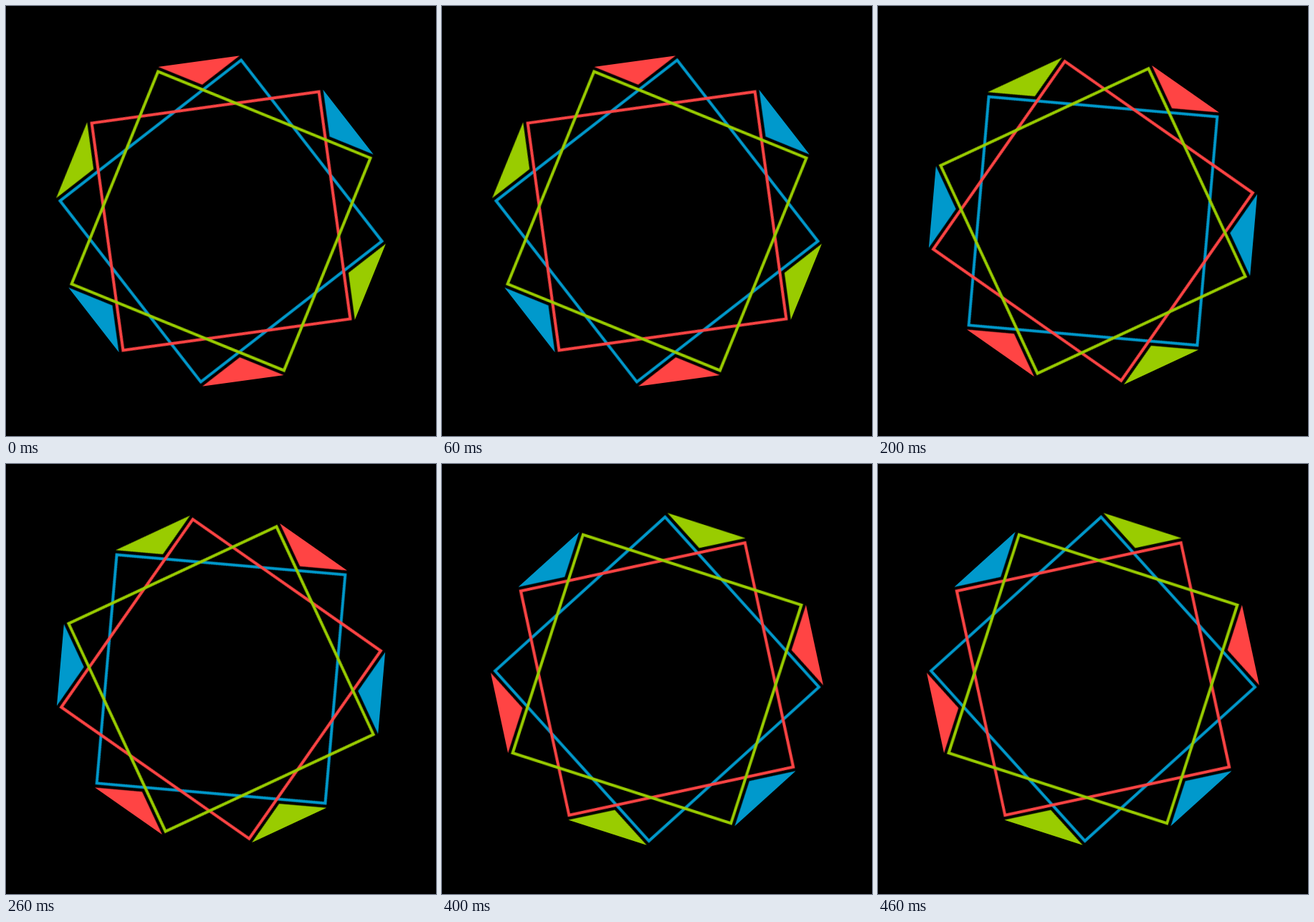
Write an HTML page that moves like this. It is 600 px wide and 600 px high and loops after 500 ms.

```html
<!DOCTYPE html>
<html lang="en">
<head>
<meta charset="utf-8">
<title>Turning squares</title>
<style>
  html, body { margin: 0; width: 100%; height: 100%; overflow: hidden; background: #000; }
  svg { display: block; width: 600px; height: 600px; }
  .red { color: #f44; }
  .blue { color: #09c; }
  .green { color: #9c0; }
  rect { fill: none; stroke: currentColor; stroke-width: 4; }
  path { fill: currentColor; }
</style>
</head>
<body>
<svg viewBox="-300 -300 600 600">
  <g id="star"></g>
</svg>
<script>
  const star = document.getElementById('star');

  function add(tag, color, angle, attrs) {
    const el = document.createElementNS('http://www.w3.org/2000/svg', tag);
    el.setAttribute('class', color);
    el.setAttribute('transform', `rotate(${angle})`);
    for (const key in attrs) el.setAttribute(key, attrs[key]);
    star.append(el);
  }

  // Angles are clockwise from straight up.
  const square = (color, angle) =>
    add('rect', color, angle + 45, { x: -160, y: -160, width: 320, height: 320 });

  function wedges(color, angle) {
    for (const turn of [0, 180]) {
      add('path', color, angle + turn, { d: 'M-57.3-225H57.3L0-192Z' });
    }
  }

  wedges('red', -15);
  wedges('blue', 45);
  wedges('green', 105);
  square('blue', 0);
  square('red', 30);
  square('green', -30);

  // Five equal jumps per loop, then a hard return to the start.
  const start = 50 / 7, jump = 150 / 7, count = 5;
  star.animate(
    [{ transform: `rotate(${start}deg)` }, { transform: `rotate(${start + jump * count}deg)` }],
    { duration: 500, iterations: Infinity, easing: `steps(${count}, end)` }
  );
</script>
</body>
</html>
```
